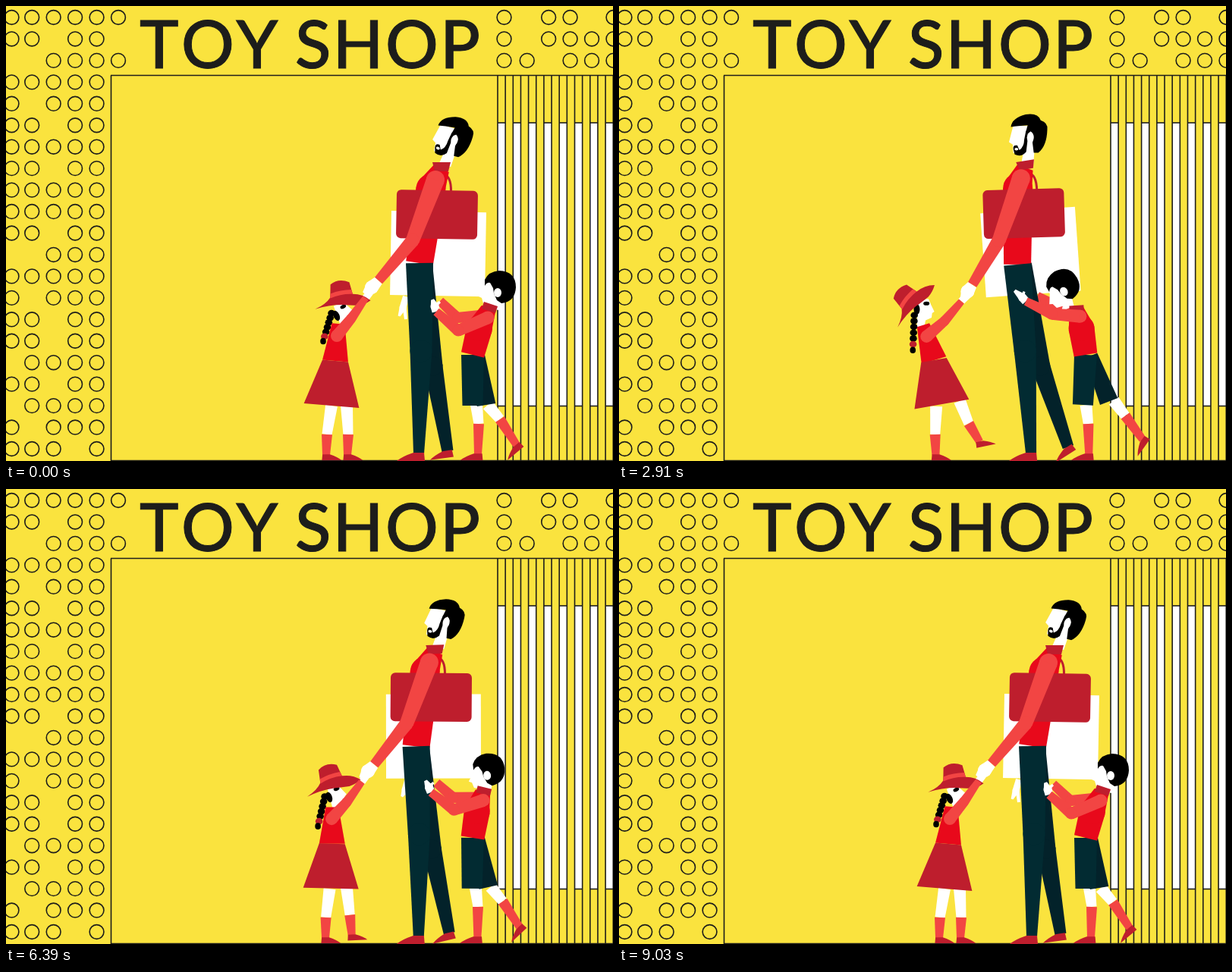
Animation, 800 px wide and 600 px high, one loop 9270 ms. Source, as an HTML page with a canvas:

```html
<!DOCTYPE html>
<html lang="en">
<head>
<meta charset="utf-8">
<title>Toy shop</title>
<style>
html, body { margin: 0; width: 100%; height: 100%; overflow: hidden; background: #fae33e }
canvas, svg { position: absolute; left: 0; top: 0; width: 800px; height: 600px }
text { font: 500 87px Lato, "Open Sans", sans-serif; fill: #1d1d1b; stroke: #1d1d1b; stroke-width: 1 }
</style>
</head>
<body>
<canvas width="800" height="600"></canvas>
<svg viewBox="0 0 800 600">
<text x="176" y="81.5" letter-spacing="6">TOY</text>
<text x="381" y="81.5" letter-spacing="2.5">SHOP</text>
</svg>
<script>
const g = document.querySelector('canvas').getContext('2d');
const INK = '#1d1d1b', YELLOW = '#fae33e', RED = '#e8091b', CORAL = '#f24543',
  WINE = '#be1e2d', CLOTH = '#022b32', SHADE = '#03222a', WHITE = '#fff', BLACK = '#000';

// ---- motion: v is 0 when everyone leans back and 1 when stepping forward
const PERIOD = 2340, PEAK = 950, BACK = 2010, LAST = 9030, LOOP = 9270;
const ease = (u, a, b) => 1 - (1 - u ** a) ** b;

function swing(p) {
  if (p < PEAK) return 1.06 * ease(p / PEAK, 2, 4.3);
  if (p < BACK) return 1.06 * (1 - ease((p - PEAK) / (BACK - PEAK), 3, 3.6));
  return -.04 * Math.sin(Math.PI * (p - BACK) / (PERIOD - BACK));
}

// ---- helpers; a joint is [x, y, dx, dy]: place when leaning back, travel to the step
let v = 0;
const place = ([x, y, dx = 0, dy = 0]) => [x + dx * v, y + dy * v];

function fill(color, path) {
  g.fillStyle = color;
  g.fill(new Path2D(path));
}
function dot(color, x, y, rx, ry = rx) {
  g.fillStyle = color;
  g.beginPath();
  g.ellipse(x, y, rx, ry, 0, 0, 7);
  g.fill();
}
// tapering shape along joints, round at inner joints
function limb(color, widths, ...joints) {
  const pts = joints.map(place);
  for (let i = 0; i + 1 < pts.length; i++) {
    const [x, y] = pts[i], [X, Y] = pts[i + 1], a = widths[i] / 2, b = widths[i + 1] / 2;
    const d = Math.hypot(X - x, Y - y), nx = (y - Y) / d, ny = (X - x) / d;
    fill(color, `M${x + nx * a} ${y + ny * a}L${X + nx * b} ${Y + ny * b} ${X - nx * b} ${Y - ny * b} ${x - nx * a} ${y - ny * a}Z`);
    if (i) dot(color, x, y, a);
  }
}
function arm(widths, ...joints) {
  dot(CORAL, ...place(joints[0]), widths[0] / 2);
  limb(CORAL, widths, ...joints);
}
function rig(draw, joint, deg = 0, turn = 0, sx = 1, sy = 1) {
  g.save();
  g.translate(...place(joint));
  g.rotate((deg + turn * v) * Math.PI / 180);
  g.scale(sx, sy);
  draw();
  g.restore();
}
// negative size faces right
function shoe(ankle, size, deg, turn) {
  rig(() => fill(WINE, 'M-7-1L7-1 8 10-29 10Q-22 4-7-1Z'), ankle, deg, turn, size, Math.abs(size));
}
function sockLeg(hip, knee, ankle, size, deg, turn) {
  limb(WHITE, [16, 13], hip, knee);
  limb(CORAL, [14, 10], knee, ankle);
  shoe(ankle, size, deg, turn);
}
function box(color, w, h, r) {
  g.fillStyle = color;
  g.beginPath();
  g.roundRect(-w / 2, -h / 2, w, h, r);
  g.fill();
}

// ---- shop front
function line(x, y, X, Y) {
  g.beginPath(); g.moveTo(x, y); g.lineTo(X, Y); g.stroke();
}
// each entry names the columns left empty in that row
const LEFT_GAPS = ',25,01,5,15,25,5,25,5,5,25,015,5,15,25,25,05,25,05,15,35'.split(',');
const RIGHT_GAPS = ['14', '1', '2'];

function rings(gaps, first, next) {
  gaps.forEach((gap, row) => {
    for (let c = 0; c < 6; c++) {
      if (gap.includes(c)) continue;
      g.beginPath();
      g.arc(c ? next + 28.45 * (c - 1) : first, 15 + 28.45 * row, 9.4, 0, 7);
      g.stroke();
    }
  });
}
function shop() {
  g.fillStyle = YELLOW; g.fillRect(0, 0, 800, 600);
  g.strokeStyle = INK; g.lineWidth = 1.6;
  rings(LEFT_GAPS, 7.5, 34.2);
  rings(RIGHT_GAPS, 656.5, 686.7);
  for (let k = 0; k < 16; k++) {
    const x = 648 + 10.15 * k;
    if (k % 2 === 0) {
      g.fillStyle = WHITE; g.fillRect(x, 154, 10.15, 373.5);
      line(x, 154, x + 10.15, 154);
      line(x, 527.5, x + 10.15, 527.5);
    }
    line(x, 91.5, x, 600);
  }
  line(138, 91.5, 800, 91.5);
  line(138.5, 91.5, 138.5, 600);
  line(138, 599.5, 800, 599.5);
}

// ---- father
const BAG = [568, 275, -38, -1.5];

function manHead() {
  fill(WHITE, 'M-20-48L-25-26-20-23-19-12-6-12-8 2 8 2 9-20 6-48Z');
  fill(BLACK, 'M-23-46Q-22-58-4-63Q12-66 16-56Q26-53 25-44Q25-22 14-13L8-13 6-26Q9-38 3-41L-2-34-3-41-1-49Q-14-48-23-46Z');
  fill(BLACK, 'M-3-42L0-36-2-14Q-8-6-17-10L-19-17Q-20-23-14-22L-11-16Q-5-20-5-30Z');
  dot(WHITE, -15, -17, 2.5, 1.8);
  dot(WHITE, 3, -33, 4.5, 7);
}
function strap() {
  g.strokeStyle = WINE; g.lineWidth = 3;
  g.stroke(new Path2D('M0-32C0-54 18-62 18-30'));
}
function man() {
  const hip = [545, 339, -22, 2], heel = [582, 587, 11, -6], foot = [544, 590, -1, 0];
  const wrist = [491, 362, -28, 6];
  limb(SHADE, [20, 25, 15], [552, 340, -20, 0], [563, 475, -8, 0], heel);
  shoe(heel, .85, -8, -27);
  rig(strap, BAG, 1, -3);
  rig(manHead, [579, 208, -45, -2], 16, -16);
  limb(RED, [22, 39, 36], [574, 214, -43, -1], [560, 241, -38, -1], hip);
  limb(WINE, [24, 18], [574, 206, -43, -2], [574, 218, -41, -3]);
  limb(CLOTH, [36, 29, 14], hip, [547, 455, -13, 0], foot);
  shoe(foot, 1, 0, 0);
  rig(() => box(WINE, 107, 64, 6), BAG, 1, -3);
  limb(WHITE, [13, 18, 8], wrist, [482, 371, -25, 6], [473, 380, -22, 10]);
  arm([24, 18, 13], [566, 229, -40, -2], [536, 309, -39, 0], wrist);
}

// ---- girl
function girlHat() {
  fill(WINE, 'M-37 0Q-22-4-15-12L-12-29Q0-36 13-28L15-12Q28-10 37 0Q29 4 20 4Q8 2 0 0Q-18-3-37 0Z');
  fill(CORAL, 'M-15-11Q0-15 15-12L14-18Q0-20-14-17Z');
}
function girlHead() {
  fill(WHITE, 'M-8-14L6-14 9-6 13 3 10 5 9 11 1 14-1 22-11 24-10 8Z');
  dot(BLACK, -10, -1, 4, 7);
  dot(BLACK, 3, -8, 4, 2.5);
}
function braid() {
  const [x, y] = place([429, 405, -44, 3]), [X, Y] = place([418, 442, -34, 13]);
  for (let i = 0; i < 7; i++)
    dot(i === 5 ? WINE : BLACK, x + (X - x) * i / 6, y + (Y - y) * i / 6, i === 6 ? 3.8 : 4.8, 4.3);
}
function girl() {
  const waist = [434, 468, -21, -1], wrist = [474, 385, -25, 5];
  sockLeg([429, 527, -12, 1], [423, 565, -7, 0], [422, 592, -5, 0], -.7, 0, 0);
  sockLeg([449, 527, 0, -7], [451, 565, 11, -16], [450, 592, 28, -19], -.7, 0, -13);
  rig(girlHead, [445, 405, -47, -5], -25, 25);
  braid();
  limb(RED, [17, 34], [438, 419, -41, 2], waist);
  limb(WINE, [34, 73], waist, [429, 527, -4, -2]);
  limb(WHITE, [10, 9], wrist, [482, 375, -27, 7]);
  rig(girlHat, [444, 394, -58, 2], -9, -44);
  arm([16, 13, 9], [436, 435, -34, 1], [455, 412, -29, 4], wrist);
}

// ---- boy
function boyHead() {
  fill(WHITE, 'M-18-14L-22 0-29 11-25 13-23 20-15 22-20 27-2 29 4 8Z');
  fill(BLACK, 'M-21-11Q-16-22-2-23Q20-22 20-1Q19 18 1 20L-5 16-9 7-10 0-14-7Q-18-8-21-3Z');
  dot(WHITE, -4, 6, 5, 6);
}
function boyReach() {
  limb(WHITE, [8, 9, 3], [527, 383, 12, 0], [523, 398, 15, -6], [518, 409, 18, -16]);
  limb(WHITE, [5, 4], [525, 396, 13, -6], [527, 413, 12, -18]);
  arm([16, 14, 12], [634, 408, -32, -2], [595, 411, -29, -21], [572, 389, -23, -7]);
}
function boy() {
  const waist = [615, 460], wrist = [567, 403, -34, -15], palm = [565, 396, -37, -13];
  sockLeg([620, 526, -5, 0], [623, 551, -5, 0], [622, 591, -3, 0], .8, 0, 0);
  sockLeg([635, 526, 19, -6], [651, 545, 18, -5], [673, 579, 19, -8], .75, -40, -16);
  limb(SHADE, [18, 25], [622, 461], [633, 526, 14, -5]);
  limb(CLOTH, [30, 27], waist, [615, 527, -4, -1]);
  rig(boyHead, [652, 372, -72, -3], 0, -33);
  limb(RED, [20, 34, 31], [636, 399, -37, 1], [624, 425, -16, 0], waist);
  limb(WINE, [19, 19], [639, 393, -40, 2], [636, 402, -36, 2]);
  limb(WHITE, [11, 11, 4], wrist, palm, [562, 387, -45, -13]);
  limb(WHITE, [5, 3], palm, [572, 390, -42, -15]);
  arm([17, 15, 11], [635, 411, -30, -2], [596, 428, -28, -24], wrist);
}

const start = performance.now();
(function tick() {
  const now = (performance.now() - start) % LOOP;
  v = swing(Math.min(Math.floor(now / 30) * 30, LAST) % PERIOD);
  shop();
  rig(() => box(WHITE, 125, 111, 0), [569.5, 326.7, -30, -2.5], 1, -5.5);
  boyReach();
  girl();
  man();
  boy();
  requestAnimationFrame(tick);
})();
</script>
</body>
</html>
```
